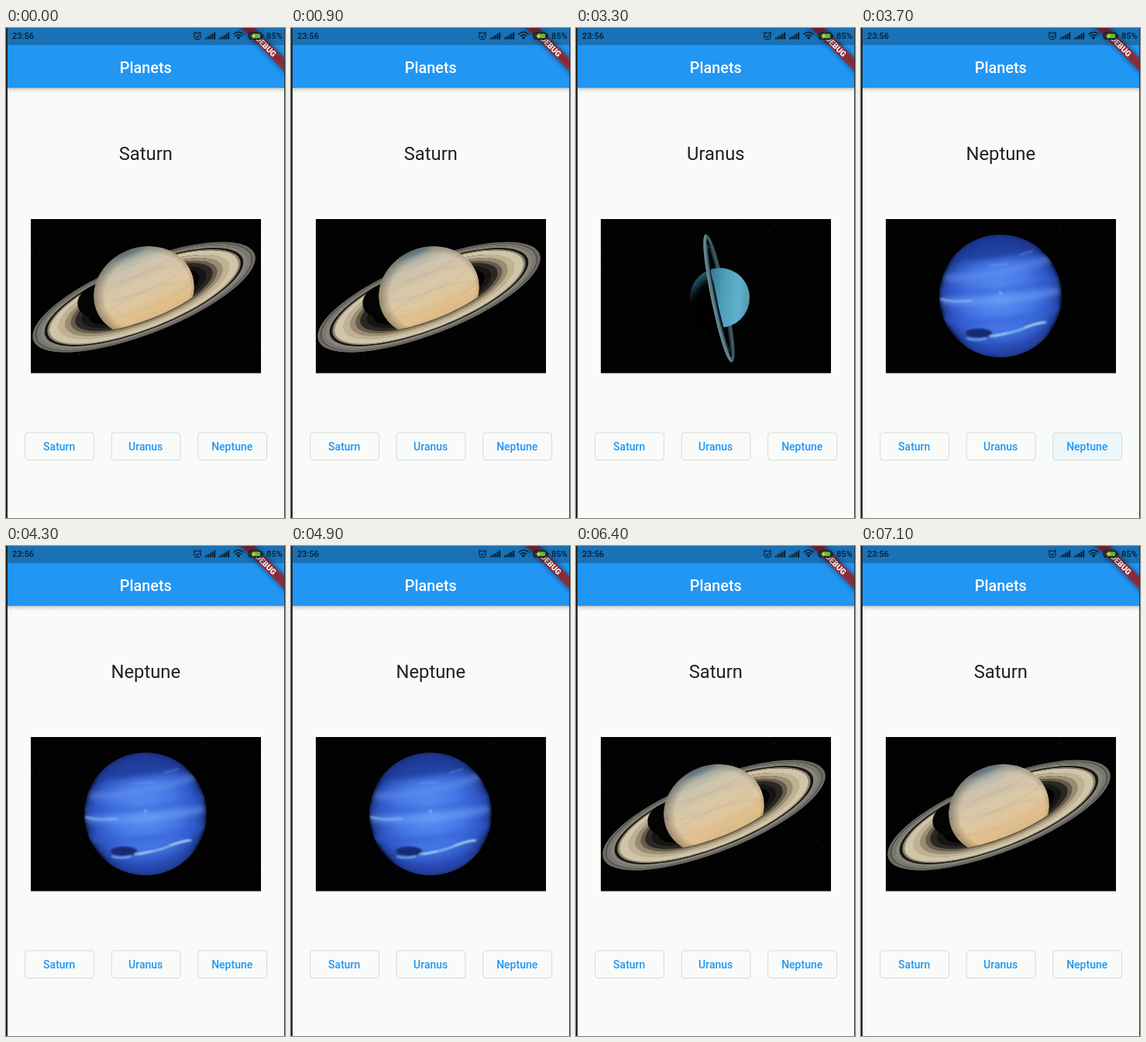
An HTML page that plays this animation: 360 by 631 pixels, repeating every 7.2 s.

```html
<!DOCTYPE html>
<html lang="en">
<head>
<meta charset="utf-8">
<title>Planets</title>
<style>
  html, body { margin: 0; width: 100%; height: 100%; overflow: hidden; background: #f9fbf8; }
  svg { display: block; width: 100vw; height: 100vh; }
  text { font-family: Roboto, "Liberation Sans", sans-serif; }
  .mid { text-anchor: middle; }
  .label { font-size: 14px; font-weight: 500; fill: #2196f3; }
  .ink { fill: #0a1c2c; }
  .line { fill: none; stroke: #0a1c2c; }
</style>
</head>
<body>
<svg viewBox="0 0 360 631" preserveAspectRatio="none">
  <defs>
    <linearGradient id="shade" x2="0" y2="1">
      <stop stop-color="#000" stop-opacity=".24"/>
      <stop offset=".4" stop-color="#000" stop-opacity=".08"/>
      <stop offset="1" stop-color="#000" stop-opacity="0"/>
    </linearGradient>
    <linearGradient id="globe" x1=".46" y1="0" x2=".54" y2="1">
      <stop stop-color="#8fa3a6"/>
      <stop offset=".1" stop-color="#b4b6a9"/>
      <stop offset=".24" stop-color="#cdc3ac"/>
      <stop offset=".5" stop-color="#dcc8a4"/>
      <stop offset=".72" stop-color="#e0c08d"/>
      <stop offset="1" stop-color="#cb9f69"/>
    </linearGradient>
    <radialGradient id="limb" cx=".53" cy=".52" r=".54">
      <stop offset=".78" stop-color="#2a1c10" stop-opacity="0"/>
      <stop offset="1" stop-color="#2a1c10" stop-opacity=".4"/>
    </radialGradient>
    <linearGradient id="teal" x1="0" x2="1" y1=".45" y2=".55">
      <stop offset=".3" stop-color="#34788f"/>
      <stop offset=".55" stop-color="#4f9fbb"/>
      <stop offset=".82" stop-color="#61b1cc"/>
      <stop offset="1" stop-color="#479ab5"/>
    </linearGradient>
    <linearGradient id="dusk" x1=".2" y1="0" x2=".35" y2=".5">
      <stop stop-color="#2b6175"/>
      <stop offset=".5" stop-color="#1b3f4d"/>
      <stop offset="1" stop-color="#020304"/>
    </linearGradient>
    <radialGradient id="blue" cx=".5" cy=".5" r=".5">
      <stop stop-color="#5a90f4"/>
      <stop offset=".55" stop-color="#4475e4"/>
      <stop offset=".82" stop-color="#3158c6"/>
      <stop offset=".94" stop-color="#213f98"/>
      <stop offset="1" stop-color="#0a153a"/>
    </radialGradient>
    <filter id="soft" x="-50%" y="-100%" width="200%" height="300%"><feGaussianBlur stdDeviation="3.5"/></filter>
    <filter id="fine" x="-50%" y="-100%" width="200%" height="300%"><feGaussianBlur stdDeviation=".9"/></filter>
    <clipPath id="photo"><rect x="32" y="246" width="297" height="198.5"/></clipPath>
    <clipPath id="front"><rect x="-1.1" width="2.2" height="1.1"/></clipPath>
    <clipPath id="above">
      <rect x="-1.1" y="-3" width="2.2" height="3" transform="translate(178 346.5) rotate(-21.4) scale(153 47)"/>
      <circle r=".8" transform="translate(178 346.5) rotate(-21.4) scale(153 47)"/>
    </clipPath>
    <clipPath id="ball"><ellipse rx="66" ry="57"/></clipPath>
    <clipPath id="lit"><path d="M170 300L178 330L184 360L192 392H230V300Z"/></clipPath>
    <clipPath id="leftRing"><path d="M-12-90H0V90H-12Z"/></clipPath>
    <clipPath id="disc"><circle cx="180" cy="345" r="79"/></clipPath>
    <clipPath id="screen"><rect width="360" height="631"/></clipPath>
  </defs>

  <rect width="360" height="631" fill="#f9fbf8"/>
  <rect y="77" width="360" height="7" fill="url(#shade)"/>
  <rect width="360" height="77" fill="#2196f3"/>
  <text class="mid" x="180.3" y="57.8" font-size="19.8" font-weight="500" fill="#fff">Planets</text>
  <text class="mid" id="name" x="180.3" y="169.5" font-size="23.8" fill="#202120"></text>

  <g clip-path="url(#photo)">
    <rect x="32" y="246" width="297" height="199" fill="#020202"/>
    <g id="stars"></g>

    <g id="Saturn">
      <g id="rings" transform="translate(178 346.5) rotate(-21.4) scale(153 47)" fill="none"></g>
      <ellipse cx="119" cy="352" rx="27" ry="21" fill="#040404" transform="rotate(-14 119 352)"/>
      <g clip-path="url(#above)">
        <g transform="translate(178 339.3) rotate(-21.4)">
          <g clip-path="url(#ball)">
            <ellipse rx="66" ry="57" fill="url(#globe)"/>
            <g id="belts" fill="none"></g>
            <ellipse cx="1" cy="-54" rx="22" ry="6" fill="#5f8798" opacity=".7" filter="url(#soft)"/>
            <ellipse rx="66" ry="57" fill="url(#limb)"/>
          </g>
        </g>
      </g>
      <g id="nearRings" transform="translate(178 346.5) rotate(-21.4) scale(153 47)" fill="none" clip-path="url(#front)"></g>
    </g>

    <g id="Uranus">
      <circle cx="185.5" cy="347.5" r="38.5" fill="url(#dusk)"/>
      <ellipse cx="180" cy="359" rx="29" ry="38" fill="#020303" filter="url(#soft)"/>
      <g transform="translate(184.5 348) rotate(-11.6)" fill="none" stroke="#4b6d78">
        <ellipse rx="8" ry="82" stroke-width="4" opacity=".8"/>
        <ellipse rx="5" ry="69" stroke="#253f49" stroke-width="1.5"/>
      </g>
      <circle cx="185.5" cy="347.5" r="38.5" fill="url(#teal)" clip-path="url(#lit)"/>
      <g transform="translate(184.5 348) rotate(-11.6)" fill="none" clip-path="url(#leftRing)">
        <ellipse rx="5.2" ry="70" stroke="#183540" stroke-width="2.5"/>
        <ellipse rx="8" ry="82" stroke="#587b86" stroke-width="4.2"/>
        <ellipse rx="9.4" ry="83.5" stroke="#7b989e" stroke-width=".8"/>
      </g>
      <ellipse cx="221.5" cy="344" rx="1.2" ry="8" fill="#a1a171" opacity=".55" filter="url(#fine)"/>
    </g>

    <g id="Neptune">
      <circle cx="180" cy="345" r="79" fill="url(#blue)"/>
      <g clip-path="url(#disc)">
        <g filter="url(#soft)">
          <path d="M110 300Q170 302 238 284L222 262H140Z" fill="#1a3592" opacity=".75"/>
          <path d="M108 322Q170 322 246 296" fill="none" stroke="#6a9cf4" stroke-width="9" opacity=".5"/>
          <path d="M100 338Q180 346 258 322" fill="none" stroke="#2c55ca" stroke-width="6" opacity=".6"/>
          <path d="M102 351Q170 358 256 338" fill="none" stroke="#79adfa" stroke-width="7" opacity=".55"/>
          <path d="M104 376Q180 386 256 360" fill="none" stroke="#2f5dd2" stroke-width="8" opacity=".6"/>
          <path d="M115 402Q180 420 246 388L235 430H125Z" fill="#2448ac" opacity=".65"/>
        </g>
        <g filter="url(#fine)" fill="none" stroke-linecap="round">
          <path d="M103 349Q120 354 142 351" stroke="#94c4fa" stroke-width="2.5" opacity=".65"/>
          <path d="M166 306L190 304M205 292L222 287" stroke="#94b8fa" stroke-width="1.5" opacity=".45"/>
          <ellipse cx="152" cy="393" rx="17" ry="6" fill="#152a72"/>
          <path d="M137 400Q148 403 161 400" stroke="#79b4e6" stroke-width="2"/>
          <path d="M167 397Q196 393 212 386T238 379" stroke="#8cc8ee" stroke-width="3" opacity=".85"/>
          <path d="M172 397L188 393M212 385L236 379" stroke="#c0e5ef" stroke-width="1.4"/>
          <circle cx="180" cy="341" r="1.5" fill="#a6ccff"/>
        </g>
      </g>
    </g>
  </g>

  <g id="buttons"></g>

  <g clip-path="url(#screen)">
    <g transform="translate(359.5 -.5) rotate(45)">
      <rect x="-60" y="28" width="120" height="12" fill="#000" opacity=".5" filter="url(#soft)"/>
      <rect x="-60" y="28" width="120" height="12" fill="#b71c1c" opacity=".7"/>
      <text class="mid" y="37.6" font-size="10.2" font-weight="900" fill="#fff">DEBUG</text>
    </g>
  </g>

  <g id="status">
    <rect width="360" height="22" opacity=".25"/>
    <text class="ink" x="8" y="14.3" font-size="11" font-weight="500">23:56</text>
    <g class="line" stroke-width="1.1">
      <circle cx="247" cy="10.5" r="4.3"/>
      <path d="M242 7L244.5 4.8M252 7L249.5 4.8M245 10.5L246.7 12.2L249.3 9.2"/>
      <path d="M293.5 8.3Q300 2.3 306.5 8.3M295.8 10.7Q300 6.7 304.2 10.7" stroke-width="1.5"/>
      <rect x="313.2" y="6" width="16.6" height="8.4" rx="3.2" fill="#2b3036"/>
    </g>
    <path class="ink" d="M297.6 12.1Q300 10 302.4 12.1L300 15ZM330.5 8.5h1.5v3.5h-1.5z"/>
    <rect x="318" y="7.5" width="10" height="5.4" rx="1.5" fill="#62bd32"/>
    <path d="M320.5 6.5L316 11H319L317.5 14.5L322.5 9.6H319.5Z" fill="#d8d437"/>
    <text class="ink" x="336" y="14.3" font-size="11" font-weight="500">85%</text>
  </g>

  <path d="M0 0H2V631H0Z" fill="#202422"/>
  <path d="M359 0H360V631H359Z" fill="#303633"/>
</svg>
<script>
const $ = id => document.getElementById(id);
const LOOP = 7200, STEP = 100;
const planets = ["Saturn", "Uranus", "Neptune"];
// Press time and chosen planet; the picture swaps on release.
const taps = [[1000, 1], [3500, 2], [5600, 0]];
const RELEASE = 100;

function add(parent, tag, attrs) {
  const el = document.createElementNS("http://www.w3.org/2000/svg", tag);
  for (const key in attrs) el.setAttribute(key, attrs[key]);
  return parent.appendChild(el);
}

// Inner radius, outer radius, colour
const bands = [
  [.5, .56, "#161513"], [.56, .62, "#2b2824"], [.62, .66, "#655c4d"],
  [.66, .71, "#9a8c72"], [.71, .77, "#bfb192"], [.77, .85, "#d0c5a8"],
  [.85, .87, "#8c8371"], [.87, .895, "#171613"], [.895, .93, "#86837a"],
  [.93, .967, "#7a776f"], [.967, .975, "#4a4843"], [.975, 1, "#6c6a64"]
];
for (const [r0, r1, stroke] of bands) {
  const ring = { r: (r0 + r1) / 2, "stroke-width": r1 - r0 + .002, stroke };
  add($("rings"), "circle", ring);
  if (r0 > .6) add($("nearRings"), "circle", ring);
}

for (let i = 0; i < 9; i++) {
  add($("belts"), "ellipse", {
    cy: -66 + i * 11, rx: 72, ry: 22,
    stroke: i % 2 ? "#efdab5" : "#a58d70", "stroke-width": 4, opacity: .08
  });
}

let seed = 17;
const rand = () => (seed = seed * 16807 % 2147483647) / 2147483647;
for (let i = 0; i < 55; i++) {
  add($("stars"), "circle", {
    cx: 33 + rand() * 295, cy: 247 + rand() * 192, r: .35 + rand() * .3,
    fill: "#8c9196", opacity: .12 + rand() * .3
  });
}

// Signal bars for both SIM slots
for (const x of [257, 275]) {
  for (let i = 0; i < 5; i++) {
    const h = 2 + i * 1.7;
    add($("status"), "rect", { class: "ink", x: x + i * 2.8, y: 14.5 - h, width: 2, height: h });
  }
}

const inks = planets.map((name, i) => {
  const x = 24.7 + i * 111.5, box = { x, y: 521, width: 88.8, height: 35.5, rx: 4 };
  const clip = add(document.querySelector("defs"), "clipPath", { id: "edge" + i });
  add(clip, "rect", box);
  const ink = add($("buttons"), "circle", {
    cx: x + 44.4, cy: 538.7, r: 0, fill: "#2196f3", "clip-path": `url(#edge${i})`
  });
  add($("buttons"), "rect", { ...box, fill: "none", stroke: "#d7dad7" });
  add($("buttons"), "text", { class: "label mid", x: x + 44.0, y: 543.7 }).textContent = name;
  return ink;
});

function draw(time) {
  const t = Math.floor(time % LOOP / STEP) * STEP;
  let current = 0;
  inks.forEach(ink => ink.setAttribute("opacity", 0));
  for (const [press, index] of taps) {
    const age = t - press;
    if (age >= RELEASE) current = index;
    if (age >= 0 && age < 400) {
      inks[index].setAttribute("r", 18 + 34 * Math.min(1, age / 200));
      inks[index].setAttribute("opacity", age < 200 ? .08 : .05 * (400 - age) / 200);
    }
  }
  planets.forEach((name, i) => $(name).style.display = i === current ? "" : "none");
  $("name").textContent = planets[current];
}

const start = performance.now();
function tick() {
  draw(performance.now() - start);
  requestAnimationFrame(tick);
}
tick();
</script>
</body>
</html>
```
